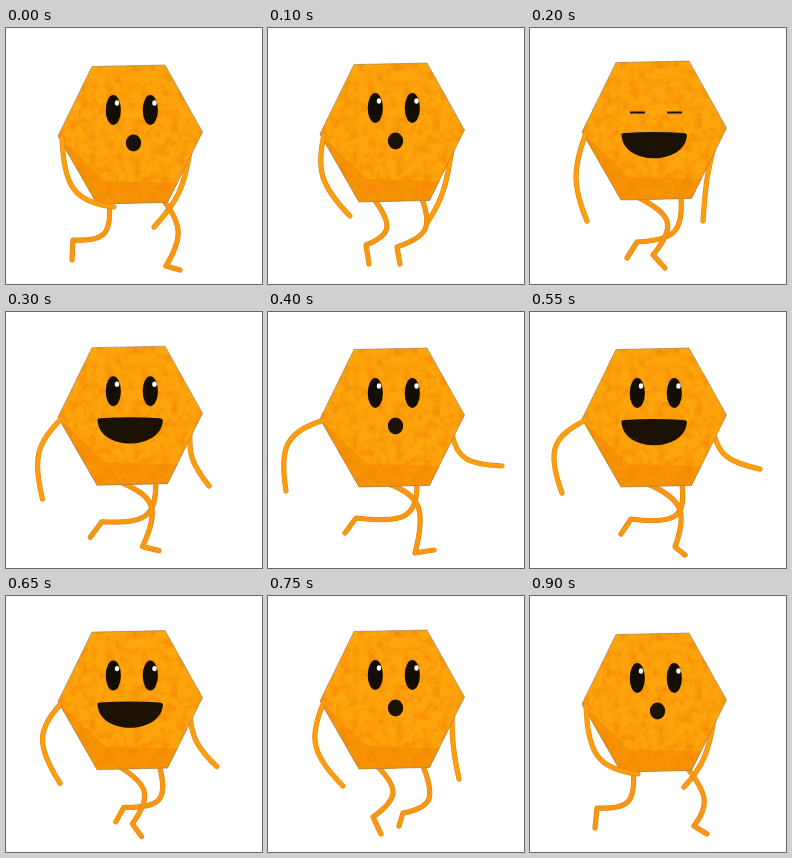
Animation of 256 by 256 pixels, one loop 1000 ms. Source, as an HTML page:

```html
<!DOCTYPE html>
<html lang="en">
<head>
<meta charset="utf-8">
<title>Walking hexagon</title>
<style>
  html, body { margin: 0; width: 100%; height: 100%; overflow: hidden; background: #fff; }
  svg { display: block; width: 100%; height: 100%; }
  .limb path { fill: none; stroke-linecap: round; stroke-linejoin: round; }
  .edge { stroke: #d9861a; stroke-width: 5.2; }
  .fill { stroke: #ff9d0c; stroke-width: 4.2; }
  .leg .fill { stroke: #fb970f; }
</style>
</head>
<body>
<svg viewBox="0 0 256 256">
  <defs>
    <filter id="grain" x="0" y="0" width="1" height="1" color-interpolation-filters="sRGB">
      <feTurbulence type="fractalNoise" baseFrequency=".11" numOctaves="3" seed="4"/>
      <feColorMatrix values="0 0 0 0 .95  0 0 0 0 .53  0 0 0 0 0  1.8 0 0 0 -.72"/>
      <feComposite in2="SourceGraphic" operator="in" result="spots"/>
      <feMerge><feMergeNode in="SourceGraphic"/><feMergeNode in="spots"/></feMerge>
    </filter>
  </defs>
  <g id="back"></g>
  <g id="body">
    <g filter="url(#grain)">
      <path fill="#ffa50c" d="M86 38.5L159 37L196.500 104L161.500 174.500L91 176L52 108Z"/>
      <path fill="#f79305" d="M52 108L99 153L171.500 155L161.500 174.500L91 176Z"/>
    </g>
    <path fill="none" stroke="#8c7f62" stroke-width=".6" d="M86 38.5L159 37L196.500 104L161.500 174.500L91 176L52 108Z"/>
    <g id="open">
      <g fill="#140d02">
        <ellipse cx="107.300" cy="82" rx="7.600" ry="15"/>
        <ellipse cx="144.300" cy="82" rx="7.600" ry="15"/>
      </g>
      <g fill="#fff">
        <ellipse cx="111" cy="75" rx="2.200" ry="2.700"/>
        <ellipse cx="148.500" cy="75" rx="2.200" ry="2.700"/>
      </g>
    </g>
    <path id="shut" stroke="#1c1204" stroke-width="2" d="M100 88.500H115M137 88.500H152"/>
    <ellipse id="round" cx="127.500" cy="115" rx="7.700" ry="8.500" fill="#1c1204"/>
    <path id="smile" fill="#1c1204" d="M91.500 111Q91 109.500 94 109Q124 107 154 109Q157 109.500 157 111C155 142 93 142 91.500 111Z"/>
  </g>
  <g id="front"></g>
</svg>
<script>
const $ = id => document.getElementById(id);
const times = [0, 100, 200, 400, 475, 550, 750, 900];

const bob = [[0], [-2], [-4], [-1], [.5], [-1], [-3], [0]];
// Arms: bend x, y, hand x, y
const leftArm = [
  [58, 172, 108, 179], [46, 151, 82, 188], [39, 150, 57, 193], [9, 123, 18, 179],
  [5, 117, 9, 173], [13, 129, 32, 181], [36, 151, 75, 190], [58, 171, 108, 178]];
const rightArm = [
  [177, 168, 148, 199], [177, 168, 159, 195], [176, 148, 173, 193], [190, 152, 234, 154],
  [197, 154, 246, 150], [190, 148, 230, 157], [184, 150, 191, 183], [177, 166, 154, 191]];
// Legs: hip x, bend x, y, ankle x, y, toe x, y
const leftLeg = [
  [103, 107, 214, 67, 212, 66, 232], [106, 130, 204, 98, 217, 101, 236],
  [107, 152, 191, 123, 227, 135, 240], [121, 161, 187, 147, 241, 166, 238],
  [122, 162, 189, 151, 242, 167, 246], [118, 161, 191, 145, 235, 155, 243],
  [109, 137, 198, 105, 221, 113, 238], [103, 107, 214, 67, 212, 65, 232]];
const rightLeg = [
  [158, 181, 203, 160, 238, 174, 242], [154, 167, 206, 129, 219, 132, 236],
  [151, 154, 212, 107, 214, 97, 230], [149, 149, 213, 88, 206, 77, 221],
  [149, 149, 213, 88, 205, 76, 219], [152, 157, 214, 101, 207, 91, 222],
  [155, 171, 210, 135, 217, 131, 230], [158, 183, 205, 164, 230, 177, 238]];

// Smooth curve through the poses at uneven times
function sample(poses, t) {
  const last = times.length - 1;
  let i = 0;
  while (i < last - 1 && t >= times[i + 1]) i++;
  const span = times[i + 1] - times[i];
  const u = (t - times[i]) / span;
  const slope = (k, c) => {
    const a = Math.max(k - 1, 0), b = Math.min(k + 1, last);
    return (poses[b][c] - poses[a][c]) / (times[b] - times[a]);
  };
  return poses[i].map((p, c) => {
    const q = poses[i + 1][c];
    const ease = u * u * (3 - 2 * u);
    return p + (q - p) * ease + span * u * (1 - u) *
      ((1 - u) * slope(i, c) - u * slope(i + 1, c));
  });
}

function makeLimb(parent, kind) {
  const g = document.createElementNS('http://www.w3.org/2000/svg', 'g');
  g.setAttribute('class', 'limb ' + kind);
  g.innerHTML = '<path class="edge"/><path class="fill"/>';
  $(parent).append(g);
  return d => { for (const path of g.children) path.setAttribute('d', d); };
}

function bend(x, y, kx, ky, ex, ey) {
  const pull = (a, k) => (a + (k - a) * .8).toFixed(2);
  return `M${x} ${y}C${pull(x, kx)} ${pull(y, ky)} ${pull(ex, kx)} ${pull(ey, ky)} ${ex} ${ey}`;
}

const drawRightArm = makeLimb('back', 'arm');
const drawRightLeg = makeLimb('back', 'leg');
const drawLeftLeg = makeLimb('back', 'leg');
const drawLeftArm = makeLimb('front', 'arm');

function leg(poses, t, dy) {
  const [hip, kx, ky, ax, ay, tx, ty] = sample(poses, t);
  return bend(hip, 173 + dy, kx, ky, ax, ay) + `L${tx} ${ty}`;
}

const show = (id, on) => $(id).setAttribute('visibility', on ? 'visible' : 'hidden');
const within = (t, a, b) => t >= a && t < b;

function draw(ms) {
  const t = Math.min(Math.floor(ms % 1000 / 50) * 50, 900);
  const [dy] = sample(bob, t);
  $('body').setAttribute('transform', `translate(0 ${dy})`);
  drawLeftArm(bend(56, 109 + dy, ...sample(leftArm, t)));
  drawRightArm(bend(184, 123 + dy, ...sample(rightArm, t)));
  drawLeftLeg(leg(leftLeg, t, dy));
  drawRightLeg(leg(rightLeg, t, dy));

  const shut = within(t, 200, 300);
  const smile = within(t, 150, 350) || within(t, 500, 700);
  show('open', !shut);
  show('shut', shut);
  show('smile', smile);
  show('round', !smile);
}

const start = performance.now();
function tick() {
  draw(performance.now() - start);
  requestAnimationFrame(tick);
}
tick();
</script>
</body>
</html>
```
